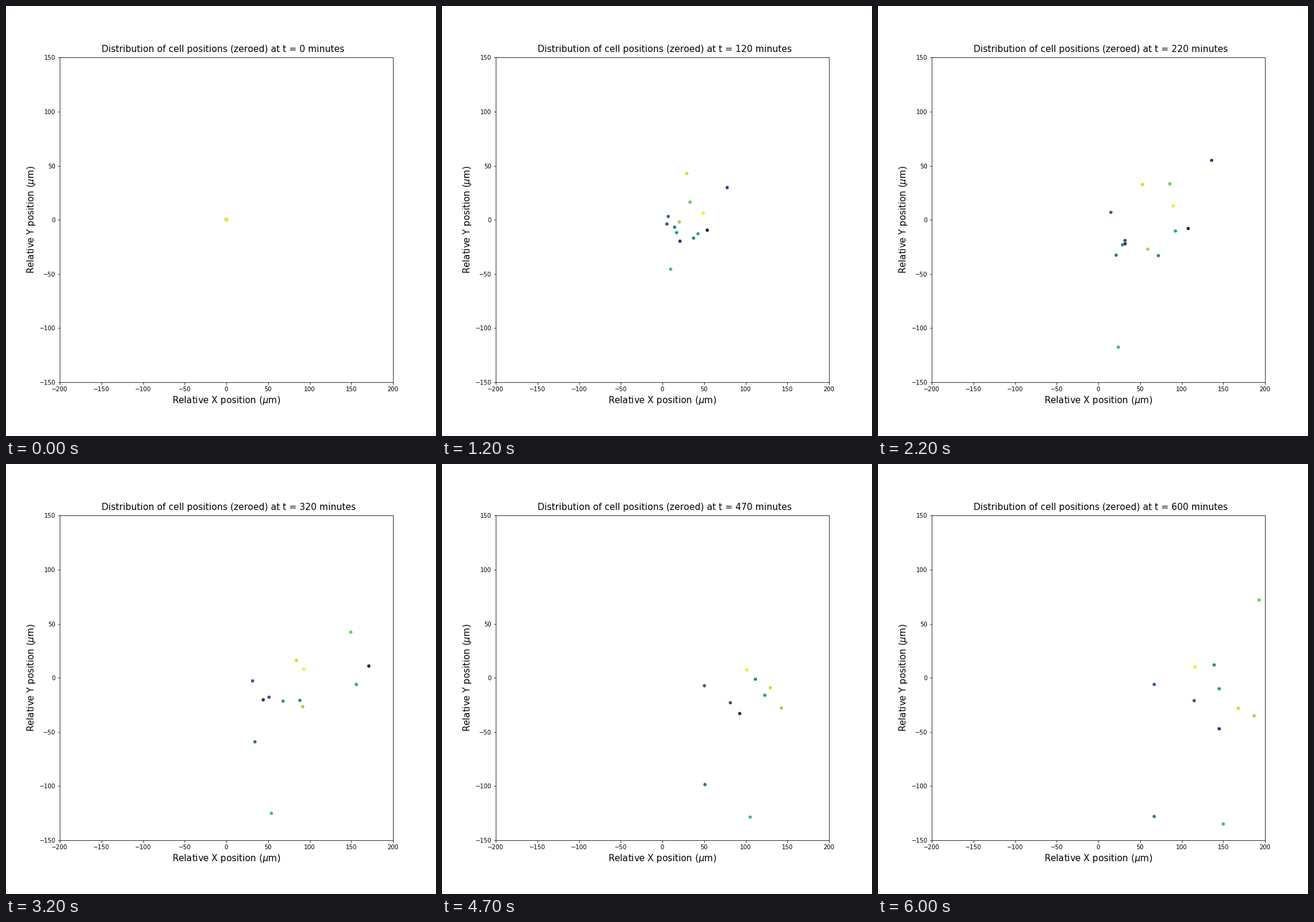
Recreate the animation shown at these times as a matplotlib script. Size 720x720 px, loop 6.1 s.

```python
import numpy as np
import matplotlib.pyplot as plt
from matplotlib.animation import FuncAnimation

FRAMES, INTERVAL = 61, 100
MINUTES_PER_FRAME = 10
WANDER = 0.8  # random step per frame, in micrometres

# Turning points (frame, x, y) of each cell's drift; every cell starts at zero.
TURNS = [
    [(17, 77, -15), (32, 171, 11), (60, 290, 0)],
    [(7, 17, -21), (34, 45, -20), (60, 145, -47)],
    [(22, 136, 55), (34, 230, 85)],
    [(17, 9, -5), (22, 32, -19), (60, 115, -21)],
    [(22, 15, 7), (60, 67, -6)],
    [(7, 11, 4), (60, 67, -128)],
    [(22, 72, -33), (60, 139, 12)],
    [(22, 29, -23), (47, 123, -16), (60, 145, -10)],
    [(17, 58, -14), (32, 156, -6), (60, 242, -6)],
    [(7, 9, -4), (20, 18, -118), (60, 150, -135)],
    [(7, 6, 6), (19, 67, 31), (46, 230, 50), (60, 193, 72)],
    [(7, -5, 18), (17, 43, -24), (60, 187, -35)],
    [(7, 18, 46), (19, 43, 38), (60, 168, -28)],
    [(22, 90, 13), (32, 93, 8), (60, 116, 10)],
]


def wander_through(turns, rng):
    """Random walk from zero that passes through every turning point."""
    points = np.array([(0, 0, 0), *turns])
    knots = points[:, 0]
    walk = np.cumsum(rng.normal(0, WANDER, (FRAMES, 2)), axis=0)
    gap = points[:, 1:] - walk[knots]
    drift = [np.interp(np.arange(FRAMES), knots, g) for g in gap.T]
    return walk + np.column_stack(drift)


rng = np.random.default_rng(4)
tracks = np.stack([wander_through(turns, rng) for turns in TURNS], axis=1)

plt.rcParams["text.kerning_factor"] = 6
fig, ax = plt.subplots(figsize=(10, 10), dpi=72)
fig.subplots_adjust(left=0.125, right=0.9, bottom=0.125, top=0.88)
ax.set_xlim(-200, 200)
ax.set_ylim(-150, 150)
ax.set_xlabel(r"Relative X position ($\mu$m)", fontsize=15)
ax.set_ylabel(r"Relative Y position ($\mu$m)", fontsize=15)
title = ax.text(-150, 155, "", fontsize=15)
cells = ax.scatter(*tracks[0].T, s=20, c=np.arange(len(TURNS)), cmap="viridis")


def update(frame):
    cells.set_offsets(tracks[frame])
    minutes = frame * MINUTES_PER_FRAME
    title.set_text(
        f"Distribution of cell positions (zeroed) at t = {minutes} minutes")
    return cells, title


anim = FuncAnimation(fig, update, frames=FRAMES, interval=INTERVAL,
                     repeat=True, repeat_delay=0)
plt.show()
```
